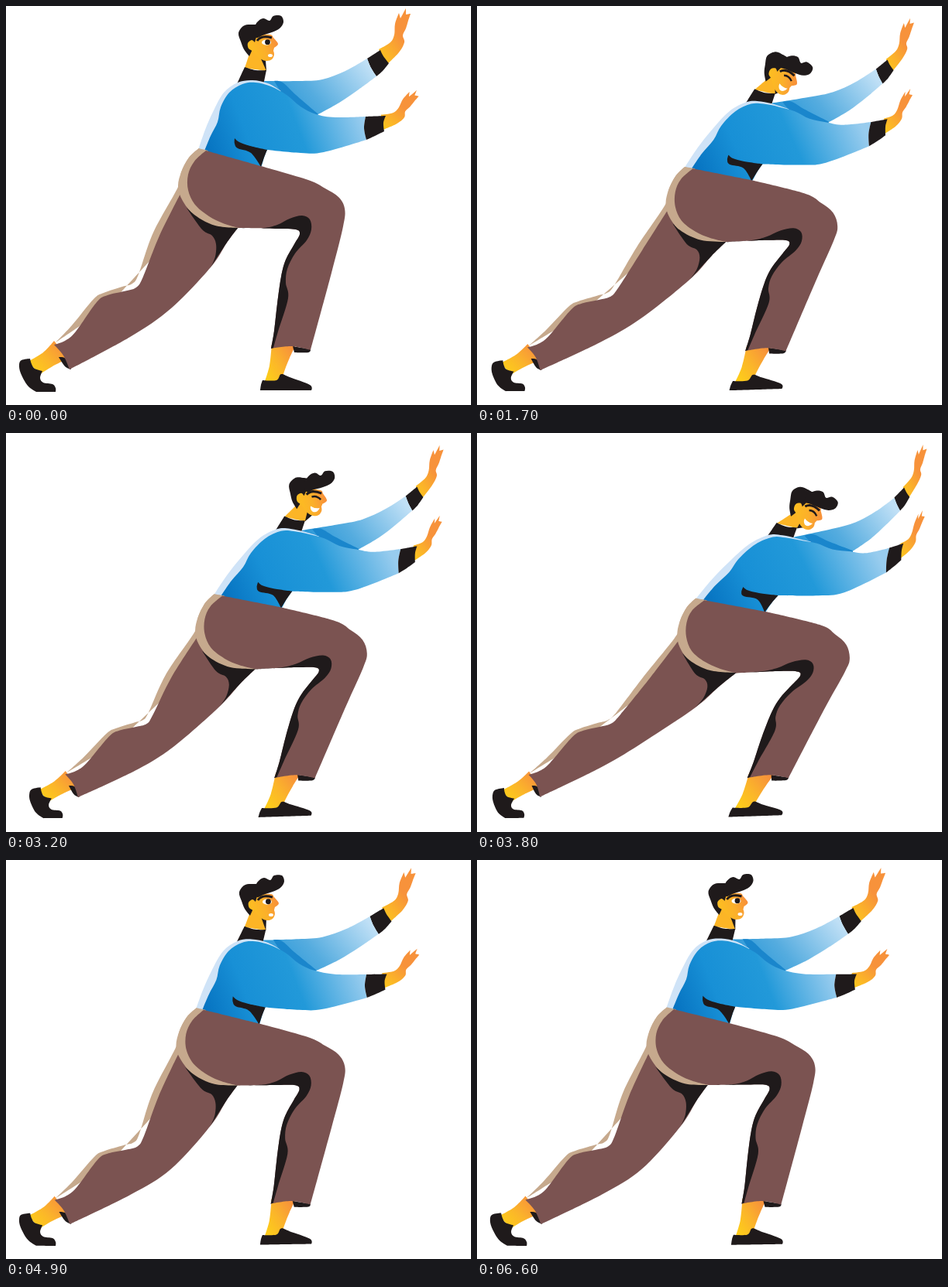
An HTML page for the animation above (6.7 s loop, 600 px wide and 516 px high).

```html
<!DOCTYPE html>
<html lang="en">
<head>
<meta charset="utf-8">
<title>Pushing man</title>
<style>
html, body { margin: 0; width: 100%; height: 100%; overflow: hidden; background: #fff; }
svg { display: block; width: 600px; height: 516px; }
</style>
</head>
<body>
<svg viewBox="0 0 600 516">
  <defs>
    <linearGradient id="torso" x1="0" y1=".75" x2="1" y2=".55">
      <stop offset="0" stop-color="#0672c0"/><stop offset=".28" stop-color="#1890d6"/>
      <stop offset=".6" stop-color="#2299d9"/><stop offset="1" stop-color="#98ccee"/>
    </linearGradient>
    <linearGradient id="sleeve" x1="0" y1=".7" x2="1" y2=".3">
      <stop offset="0" stop-color="#2596d8"/><stop offset=".4" stop-color="#55acdf"/>
      <stop offset="1" stop-color="#c0e0f6"/>
    </linearGradient>
    <linearGradient id="hand" x1=".1" y1="1" x2=".7" y2=".2">
      <stop offset="0" stop-color="#fcc81c"/><stop offset=".35" stop-color="#fbb02b"/>
      <stop offset=".75" stop-color="#f7923b"/>
    </linearGradient>
    <linearGradient id="ankle" x1=".1" y1=".8" x2=".9" y2=".2">
      <stop offset="0" stop-color="#fdcb1b"/><stop offset=".45" stop-color="#fbb52a"/>
      <stop offset="1" stop-color="#f7923b"/>
    </linearGradient>
    <linearGradient id="face" x1="0" y1=".7" x2="1" y2=".4">
      <stop offset="0" stop-color="#fdc01f"/><stop offset=".55" stop-color="#fbb02a"/>
      <stop offset="1" stop-color="#f78f3a"/>
    </linearGradient>
  </defs>
  <g id="body"></g>
  <g id="head">
    <path id="hair" fill="#1f1a1b"/>
    <path id="skin" fill="url(#face)"/>
    <path id="quiff" fill="#1f1a1b"/>
    <path d="M9,-5Q14,-13 28,-9" fill="none" stroke="#1f1a1b" stroke-width="3"/>
    <g id="stern">
      <ellipse cx="21" cy="-3" rx="6" ry="3.6" fill="#fff"/>
      <circle cx="22.5" cy="-3.3" r="3.4" fill="#1f1a1b"/>
      <ellipse cx="26" cy="14" rx="3" ry="2" fill="#fff"/>
    </g>
    <g id="smile">
      <path d="M16,-3Q22,-6 28,-1" fill="none" stroke="#1f1a1b" stroke-width="2.4"/>
      <path d="M16,9Q22,12 28,10Q26,17 20,16Q16,14 16,9Z" fill="#fff"/>
    </g>
  </g>
</svg>
<script>
const start = performance.now();
const $ = id => document.getElementById(id);
const INK = '#1f1a1b', BROWN = '#7b5351', TAN = '#c6a98d', LIGHT = '#cfe3f7';
const LOOP = 6700, CYCLE = LOOP / 3, STEP = 100, LEAD = 40;

// Joints: rest x,y, shift when leaning, shift when crouching
const upperJoints = {
  hip: [249, 184, 29, 28, -8, 13],
  belly: [329, 207, 37, 22, -7, 8],
  back: [274, 148, 47, 28, -6, 9],
  shoulder: [297, 100, 69, 30, -5, 10],
  collar: [335, 90, 67, 37, -6, 12],
  armpit: [401, 140, 73, 12, -9, 5],
  farWrist: [480, 73, 63, 13, 4, 9],
  farFingers: [518, 3, 54, 12, 11, 14],
  nearWrist: [477, 157, 57, 4, 0, 11],
  nearFingers: [530, 108, 40, -7, -1, 12]
};
const lowerJoints = {
  seat: [223, 232, 32, 25, -7, 13],
  crotch: [300, 286, 31, 22, -3, 8],
  knee: [437, 262, 39, 28, -2, 8],
  kneeBack: [378, 294, 34, 17, -3, 3],
  shin: [360, 360, 21, 8, -3, 4],
  hem: [367, 443, 8, 2, -1, 2],
  frontFoot: [360, 488, 0, 0, 0, 0],
  backThigh: [190, 293, 23, 20, -3, 15],
  backKnee: [163, 360, 5, 12, 3, 12],
  calf: [217, 388, -3, 13, 0, 17],
  backHem: [72, 453, 2, 2, 1, 2],
  backFoot: [40, 480, 0, 0, 0, 0]
};
const joints = Object.values({ ...upperJoints, ...lowerJoints });

// Motion rules
const ease = u => { u = Math.min(1, Math.max(0, u)); return u * u * (3 - 2 * u); };
const ramp = (t, from, to) => ease((t - from) / (to - from));
const pulse = (t, a, b, c, d) => ramp(t, a, b) * (1 - ramp(t, c, d));

function poseAt(t) {
  const effort = pulse(t, 150, 700, 2033, CYCLE);
  const push = 1.18 * pulse(t, 280, 1440, 1500, 1980);
  return {
    lean: effort * push,
    crouch: effort * (1 - push),
    kick: pulse(t, 580, 800, 850, 1650),
    nod: pulse(t, 750, 1250, 1700, 1960),
    happy: t > 900 && t < 1830
  };
}

// Outlines in the rest pose; * marks a corner
const innerLeg = '342,443* 346,420 350,385 355,350 361,328 372,308 379,295 374,289 350,288 300,287*';
const seatEdge = '280,281 262,272 244,257 235,238 235,218 243,201 258,187*';
const hand = '-7,-11* 8,-20 13,-30 14,-44 19,-58* 21,-51* 28,-64* 28,-56* 34,-57* 31,-48* 28,-38 24,-29 26,-20 19,-7 2,10*';

const parse = text => text.split(' ').map(s => {
  const [x, y] = s.replace('*', '').split(',').map(Number);
  return { x, y, corner: s.endsWith('*') };
});

// Turn, scale and move points
function place(pts, x, y, degrees, scale = 1) {
  const r = degrees * Math.PI / 180, c = Math.cos(r) * scale, s = Math.sin(r) * scale;
  return pts.map(p => ({ ...p, x: x + p.x * c - p.y * s, y: y + p.x * s + p.y * c }));
}

const shapes = [
  ['url(#hand)', place(parse(hand), 488, 67, 0)],
  [INK, '466,68* 483,57* 487,65 494,74* 486,84 478,91* 471,80'],
  ['url(#sleeve)', '333,97* 378,97 408,95 438,84 466,68* 471,80 478,91* 455,108 430,125 401,141* 360,135 333,110*'],
  ['#1a86cc', '346,97* 357,99 374,115 402,139* 398,142 360,120*'],
  [INK, '308,79* 322,83 336,83* 333,98* 330,106* 297,103*'],
  [LIGHT, '248,186* 257,160 267,137 281,112 299,99 318,96 338,100 355,110* 310,150 257,189*'],
  ['url(#torso)', '255,190* 264,168 273,150 277,131 288,112 305,101 322,99 342,104 362,115 380,130 400,140 425,144 464,143* 462,158 465,173* 410,189 380,190 337,186* 333,196 329,210* 295,202'],
  [INK, '295,171* 301,176 315,181 337,186* 333,196 329,208* 316,190 299,184 295,178'],
  ['url(#hand)', place(parse(hand), 486, 152, 22, .88)],
  [INK, '464,143* 490,142* 487,151 488,162* 476,168 465,173* 462,158'],
  ['url(#ankle)', '62,433* 80,456* 60,466 44,476* 28,460* 48,448'],
  [INK, '17,464 20,458 31,456* 33,463 37,469 47,472* 44,481 48,487 60,489 64,494 64,499* 39,499* 28,491 19,475'],
  [INK, '68,454* 77,456 84,470* 76,466'],
  [TAN, '249,184* 236,196 226,215 222,234 190,293 171,347 163,359 150,363 126,371 113,379 85,413 63,436* 130,390* 250,260*'],
  [BROWN, '225,243* 198,297 177,350 168,364 152,369 131,374 117,383 90,421 76,433 62,438* 74,452 82,470* 160,428 213,391 264,338 285,306 300,286* 260,250'],
  [INK, '233,261* 248,272 270,280 300,286* 285,306 264,338* 270,324 271,308 266,297 253,289'],
  ['url(#ankle)', '343,436* 375,436* 366,455 360,470 355,485* 333,488* 340,465'],
  [INK, '331,484* 349,484 355,476 366,480 392,490 394,497* 328,497* 329,490'],
  [INK, '370,440* 393,444* 390,448 372,448*'],
  [TAN, '249,184* 260,187* 300,240* 303,287* 270,284 243,270 228,252 222,234 226,215 236,196'],
  [BROWN, `${innerLeg} ${seatEdge} 329,207* 390,225 412,236 429,247 437,262 435,285 420,345 393,445* 368,440`],
  [INK, `${innerLeg} 332,287 350,283 366,275 382,271 392,276 394,289 388,303 373,320 363,340 361,358 364,378 351,421 345,442*`]
];

// Closed smooth curve through the points, sharp at corners
function outline(pts) {
  const n = pts.length, at = i => pts[(i + n) % n];
  const show = (x, y) => x.toFixed(2) + ',' + y.toFixed(2);
  const handle = (i, k) => {
    const p = at(i), a = at(i - 1), b = at(i + 1), m = p.corner ? 0 : k / 6;
    return show(p.x + (b.x - a.x) * m, p.y + (b.y - a.y) * m);
  };
  const curve = (p, i) => `C${handle(i, 1)} ${handle(i + 1, -1)} ${show(at(i + 1).x, at(i + 1).y)}`;
  return 'M' + show(pts[0].x, pts[0].y) + pts.map(curve).join('') + 'Z';
}

// Gaussian elimination with several right-hand columns
function solve(rows, n) {
  for (let c = 0; c < n; c++) {
    let best = c;
    for (let r = c + 1; r < n; r++) if (Math.abs(rows[r][c]) > Math.abs(rows[best][c])) best = r;
    [rows[c], rows[best]] = [rows[best], rows[c]];
    const pivot = rows[c][c];
    rows[c] = rows[c].map(v => v / pivot);
    for (let r = 0; r < n; r++) {
      const k = rows[r][c];
      if (r !== c && k) rows[r] = rows[r].map((v, j) => v - k * rows[c][j]);
    }
  }
  return rows.map(r => r.slice(n));
}

// Radial-basis warp: spreads the joint shifts smoothly over the figure
const basis = (x, y) => [...joints.map(j => Math.hypot(x - j[0], y - j[1])), 1, x / 100, y / 100];
const size = joints.length + 3;
const system = joints.map(([x, y, ...shift]) => [...basis(x, y), ...shift]);
for (let k = joints.length; k < size; k++) {
  system.push([...joints.map(([x, y]) => basis(x, y)[k]), 0, 0, 0, 0, 0, 0, 0]);
}
const weights = solve(system, size);

function bind(p) {
  const b = basis(p.x, p.y);
  const shift = [0, 1, 2, 3].map(j => b.reduce((sum, v, i) => sum + v * weights[i][j], 0));
  const slide = 12 * ramp(p.y, 300, 380) * ramp(p.x, 300, 150);
  return { ...p, shift, slide };
}
const posed = (p, { lean, crouch, kick }) => ({
  x: p.x + p.shift[0] * lean + p.shift[2] * crouch + p.slide * kick,
  y: p.y + p.shift[1] * lean + p.shift[3] * crouch,
  corner: p.corner
});

function addPath(fill) {
  const el = document.createElementNS('http://www.w3.org/2000/svg', 'path');
  el.setAttribute('fill', fill);
  $('body').append(el);
  return el;
}
const neck = addPath('#fcb526'), chinShade = addPath(INK);
const parts = shapes.map(([fill, pts]) => ({
  el: addPath(fill),
  pts: (typeof pts === 'string' ? parse(pts) : pts).map(bind)
}));
const collar = parse('308,80* 336,84*').map(bind);
const jaw = parse('19,20* 10,0* 1,6*'), chin = parse('13,16* 20,20*');

$('hair').setAttribute('d', outline(parse('-1,15* -8,6 -12,-4 -15,-15 -9,-24 0,-26 12,-24 14,-10* 10,-1 4,4*')));
$('skin').setAttribute('d', outline(parse('9,-13* 26,-13 30,-9 36,-1 31,4* 30,8* 31,13 28,19 21,21 13,18 4,9 -2,5 -3,-2 2,-6 6,-3*')));
$('quiff').setAttribute('d', outline(parse('4,-18 9,-29 17,-34 25,-31 30,-37 40,-37 43,-29 38,-21 28,-16 16,-12 8,-9')));

function draw(t) {
  const pose = poseAt(t), { lean, crouch, kick, nod, happy } = pose;
  for (const { el, pts } of parts) el.setAttribute('d', outline(pts.map(p => posed(p, pose))));

  const x = 315 + 82 * lean - 3 * crouch + 6 * nod;
  const y = 50 + 39 * lean + 12 * crouch + 3 * nod;
  const turn = 28 * nod - 4 * kick, swing = 14 * nod - 10 * kick;
  const [back, front] = collar.map(p => posed(p, pose));
  neck.setAttribute('d', outline([...place(jaw, x, y, turn), back, front]));
  chinShade.setAttribute('d', outline([...place(chin, x, y, turn), front]));

  $('head').setAttribute('transform', `translate(${x} ${y}) rotate(${turn})`);
  $('quiff').setAttribute('transform', `rotate(${swing} 12 -18)`);
  $('smile').style.display = happy ? '' : 'none';
  $('stern').style.display = happy ? 'none' : '';
}

function tick() {
  const held = Math.floor((performance.now() - start + LEAD) / STEP) * STEP;
  draw(held % LOOP % CYCLE);
  requestAnimationFrame(tick);
}
tick();
</script>
</body>
</html>
```
